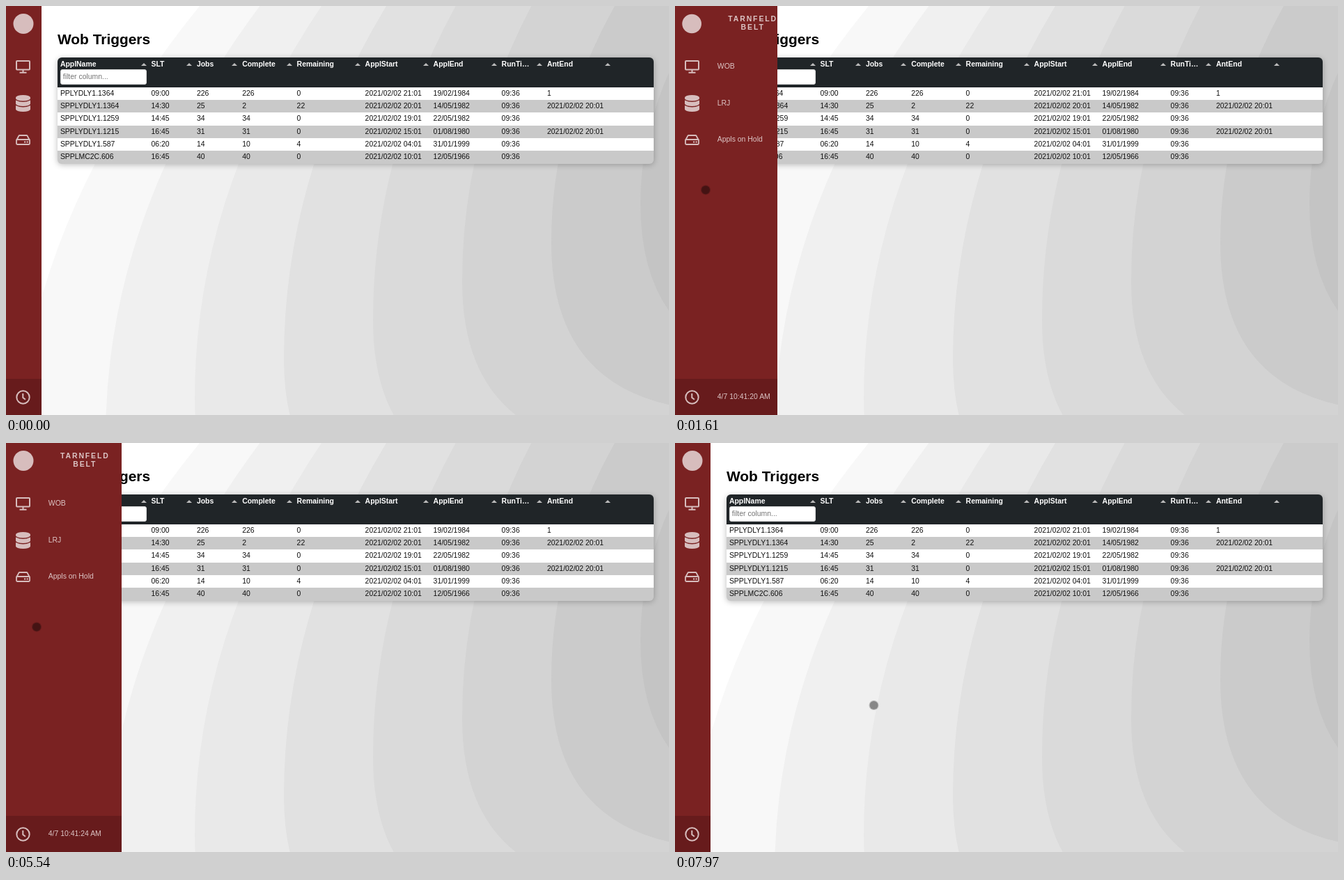
An HTML page that plays this animation: 952x588 px, repeating every 8000 ms.

```html
<!DOCTYPE html>
<html lang="en">
<head>
<meta charset="utf-8">
<title>Wob Triggers</title>
<style>
  html, body { margin: 0; width: 100%; height: 100%; overflow: hidden; background: #fff; }
  body { position: relative; font: 10.45px "Liberation Sans", Arial, sans-serif; color: #111; }
  #backdrop { position: absolute; left: 0; top: 0; }
  h1 { position: absolute; left: 74px; top: 35px; margin: 0; font-size: 20.9px; line-height: 25px; color: #000; }
  #table { position: absolute; left: 74.3px; top: 74.4px; width: 855.5px; height: 152px; border-radius: 6px;
    box-shadow: 0 2px 8px rgba(0,0,0,.27); }
  .row { position: absolute; left: 0; width: 100%; height: 18.33px; line-height: 18.6px; background: #fff; }
  .row:nth-child(odd) { background: #c9c9c9; }
  .row:last-child { border-radius: 0 0 6px 6px; }
  .row.head { height: 42.2px; line-height: 19px; border-radius: 6px 6px 0 0; background: #202528; color: #fff; font-weight: bold; }
  .row span { position: absolute; white-space: nowrap; }
  .row i { position: absolute; top: 7.4px; border: 4px solid transparent; border-top: 0; border-bottom-color: #bbb; }
  #filter { position: absolute; left: 3.5px; top: 17px; width: 119px; height: 20px; line-height: 20px; padding-left: 3px;
    border: 1px solid #ddd; border-radius: 3px; background: #fff; color: #757575; font-weight: normal; }
  nav { position: absolute; left: 0; top: 0; height: 100%; overflow: hidden; background: #7a2222; color: #dcc5c5; }
  .item { position: absolute; left: 0; width: 100%; height: 52px; display: flex; align-items: center; line-height: 12px; }
  .item svg { flex: 0 1 21px; min-width: 0; margin: 0 14.4px; fill: none; stroke: #d7bdbd; stroke-width: 2; }
  .item span { margin-left: 11px; }
  .item.brand { height: 49px; font-weight: bold; letter-spacing: 1.9px; text-align: center; }
  .item.brand svg { flex-basis: 38px; margin: 0 0 0 6px; }
  .item.brand span { margin-left: 34px; white-space: nowrap; }
  .item.foot { background: #671b1c; }
  .closed span { display: none; }
  #pointer { position: absolute; left: -7px; top: -7px; width: 12px; height: 12px; border-radius: 50%;
    background: rgba(0,0,0,.44); background-clip: padding-box; border: 1px solid rgba(0,0,0,.2); }
</style>
</head>
<body>
<svg id="backdrop" width="952" height="588"></svg>
<h1>Wob Triggers</h1>
<div id="table"></div>
<nav id="side">
  <div class="item brand" style="top:0">
    <svg viewBox="0 0 38 32" height="32"><circle cx="19" cy="16.5" r="14.5" fill="#d7bdbd" stroke="none"/></svg>
    <span>TARNFELD<br>BELT</span>
  </div>
  <div class="item" style="top:61px">
    <svg viewBox="0 0 21 19" height="19"><rect x="1" y="1" width="19" height="12.5" rx="1"/><path d="M10.5 14v4M5.5 17.8h10"/></svg>
    <span>WOB</span>
  </div>
  <div class="item" style="top:114px">
    <svg viewBox="0 0 21 24" height="24"><g fill="#d7bdbd" stroke="none">
      <path d="M0 3.5A10.5 3.5 0 0 1 21 3.5V5A10.5 3.5 0 0 1 0 5z"/>
      <path d="M0 7.5Q10.5 12.5 21 7.5V12.5A10.5 3.5 0 0 1 0 12.5z"/>
      <path d="M0 15Q10.5 20 21 15V20.5A10.5 3.5 0 0 1 0 20.5z"/></g></svg>
    <span>LRJ</span>
  </div>
  <div class="item" style="top:166px">
    <svg viewBox="0 0 21 15" height="15"><path stroke-width="1.8" d="M1 8L4.5 1.5Q4.8 1 5.5 1H15.5Q16.2 1 16.5 1.5L20 8"/>
      <rect stroke-width="1.8" x="1" y="7" width="19" height="7" rx="1.2"/>
      <path stroke-width="2.2" d="M12 10.5h2.2M15.6 10.5h2.2"/></svg>
    <span>Appls on Hold</span>
  </div>
  <div class="item foot" style="top:536px">
    <svg viewBox="0 0 21 21" height="21"><circle cx="10.5" cy="10.5" r="9.2"/><path d="M10.3 5v6l3.6 2.7"/></svg>
    <span id="clock"></span>
  </div>
</nav>
<div id="pointer"></div>
<script>
const $ = id => document.getElementById(id);

// Backdrop: nested curved bands, each one step darker
for (let i = 0; i < 8; i++) {
  const top = 278 + 86 * i + .37 * i ** 3, left = 15 + 128 * i, mid = 676 - 56 * i;
  const grey = Math.round(255 - 7.4 * (i + 1));
  $('backdrop').innerHTML +=
    `<path fill="rgb(${grey},${grey},${grey})" d="M${top} 0Q${left} ${mid * .48} ${left} ${mid}q0 200 177 235H1300V0z"/>`;
}

// Table: column widths are in page units, shown at a reduced zoom
const ZOOM = .6533;
const heads = 'ApplName,SLT,Jobs,Complete,Remaining,ApplStart,ApplEnd,RunTi…,AntEnd'.split(',');
const widths = [200, 100, 100, 120, 150, 150, 150, 100, 150];
const rows = [
  'PPLYDLY1.1364,09:00,226,226,0,2021/02/02 21:01,19/02/1984,09:36,1',
  'SPPLYDLY1.1364,14:30,25,2,22,2021/02/02 20:01,14/05/1982,09:36,2021/02/02 20:01',
  'SPPLYDLY1.1259,14:45,34,34,0,2021/02/02 19:01,22/05/1982,09:36,',
  'SPPLYDLY1.1215,16:45,31,31,0,2021/02/02 15:01,01/08/1980,09:36,2021/02/02 20:01',
  'SPPLYDLY1.587,06:20,14,10,4,2021/02/02 04:01,31/01/1999,09:36,',
  'SPPLMC2C.606,16:45,40,40,0,2021/02/02 10:01,12/05/1966,09:36,'
];
let edge = 3.6;
const lefts = widths.map(width => (edge += width * ZOOM) - width * ZOOM);
const cells = texts => texts.map((text, i) => `<span style="left:${lefts[i]}px">${text}</span>`).join('');
const arrows = lefts.map((x, i) => `<i style="left:${x + widths[i] * ZOOM - 15}px"></i>`).join('');
$('table').innerHTML =
  `<div class="row head" style="top:0">${cells(heads)}${arrows}<div id="filter">filter column...</div></div>` +
  rows.map((row, i) => `<div class="row" style="top:${42.2 + i * 18.33}px">${cells(row.split(','))}</div>`).join('');

const clamp = p => Math.min(1, Math.max(0, p));
const smooth = p => p * p * (3 - 2 * p);
const curve = (a, b, c, p) => a * (1 - p) ** 2 + 2 * b * p * (1 - p) + c * p * p;

// Standard CSS "ease": bisect for the curve parameter
function ease(p) {
  let low = 0, high = 1, s;
  for (let i = 0; i < 20; i++) {
    s = (low + high) / 2;
    if (.75 * s * (1 - s) + s ** 3 < p) low = s; else high = s;
  }
  return .3 * s * (1 - s) ** 2 + 3 * s * s * (1 - s) + s ** 3;
}

const OPEN = 1480, CLOSE = 7690;
function sideWidth(t) {
  const shown = t < CLOSE ? ease(clamp((t - 1487) / 232)) : 1 - ease(clamp((t - 7653) / 300));
  return 51 + 115 * shown;
}

// Pointer moves: start and end time, bend point, end point
const moves = [
  [500, 740, 22, 265, 44, 264.4],
  [6500, 6920, 133, 261.4, 225, 279],
  [7110, 7320, 256, 320, 222.5, 366],
  [7680, 7970, 250, 372, 285.5, 377]
];
function pointerAt(t) {
  let x = 0, y = 265;
  for (const [from, to, bendX, bendY, endX, endY] of moves) {
    const p = smooth(clamp((t - from) / (to - from)));
    x = curve(x, bendX, endX, p);
    y = curve(y, bendY, endY, p);
    if (p < 1) break;
  }
  return [x, y];
}

const start = performance.now();
function draw() {
  const t = (performance.now() - start) % 8000;
  const [x, y] = pointerAt(t);
  $('side').style.width = sideWidth(t) + 'px';
  $('side').className = t < OPEN || t >= CLOSE ? 'closed' : '';
  $('clock').textContent = `4/7 10:41:${20 + Math.max(0, Math.floor((t - 1221) / 984))} AM`;
  $('pointer').style.display = t < 500 ? 'none' : '';
  $('pointer').style.transform = `translate(${x}px, ${y}px)`;
  requestAnimationFrame(draw);
}
draw();
</script>
</body>
</html>
```
